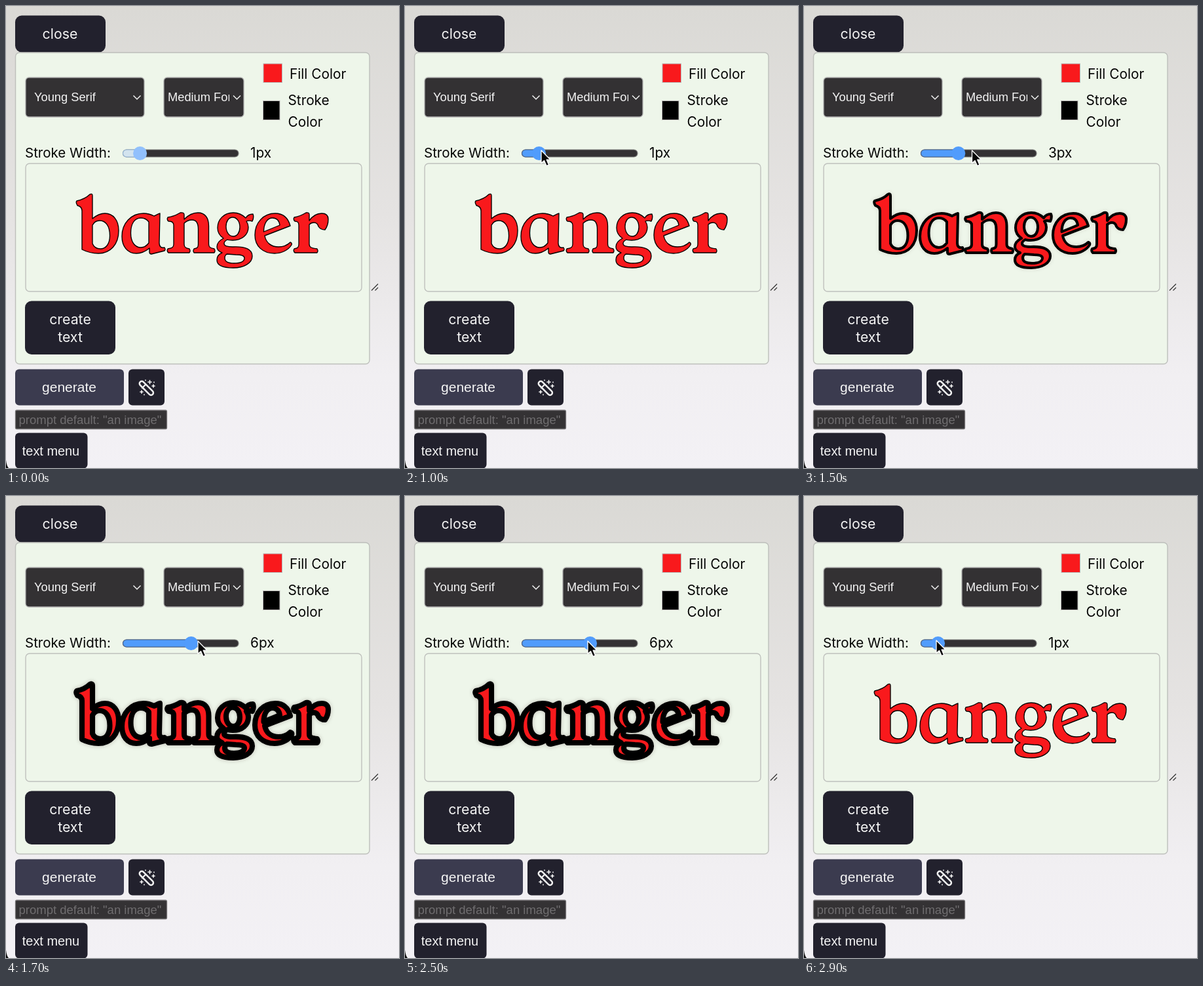
An HTML page that plays this animation: 600 by 704 pixels, repeating every 3000 ms.

```html
<!DOCTYPE html>
<html lang="en">
<head>
<meta charset="utf-8">
<title>Text menu</title>
<style>
  html, body { margin: 0; width: 100%; height: 100%; overflow: hidden; }
  svg { display: block; width: 600px; height: 704px; }
  text { font: 20.8px Inter, sans-serif; fill: #050505; }
  .arial { font-family: "Liberation Sans", Arial, sans-serif; }
  .small { font-size: 18.3px; }
  .light { fill: #f4f4f4; }
  .mid { text-anchor: middle; }
  .button { font-size: 21.3px; }
  .dark { fill: #22212d; }
  .field { fill: #333133; stroke: #aaa; stroke-width: 1.3; }
  .line { fill: none; stroke: #f0f0f0; stroke-width: 1.5; }
  .outline { fill: none; stroke: #bfc1bd; stroke-width: 1.4; }
</style>
</head>
<body>
<svg viewBox="0 0 600 704">
  <defs>
    <linearGradient id="sky" x2="0" y2="1">
      <stop stop-color="#dad9d5"/>
      <stop offset=".45" stop-color="#e5e3e2"/>
      <stop offset=".8" stop-color="#f1eff2"/>
      <stop offset="1" stop-color="#f3f1f5"/>
    </linearGradient>
    <clipPath id="selectClip"><rect x="243" y="112" width="98" height="54"/></clipPath>
  </defs>
  <rect width="600" height="704" fill="url(#sky)"/>
  <path d="M0 692Q1 701 4 704H0Z" fill="#111"/>

  <rect class="dark" x="14" y="14.500" width="138" height="56" rx="10"/>
  <text class="button light mid" x="82.500" y="50">close</text>

  <rect x="14.500" y="71" width="540.500" height="474.500" rx="6" fill="#eef6ea" stroke="#bdbfbb" stroke-width="1.400"/>
  <rect class="field" x="30" y="109" width="181" height="60" rx="5"/>
  <text class="arial small light" x="43" y="145">Young Serif</text>
  <path class="line" d="M194.500 136.500l5.500 5.500 5.500-5.500"/>
  <rect class="field" x="241" y="109" width="122" height="60" rx="5"/>
  <text class="arial small light" x="247" y="145" clip-path="url(#selectClip)">Medium Font</text>
  <path class="line" d="M347 136.500l5.500 5.500 5.500-5.500"/>

  <rect x="393" y="88" width="28.500" height="28.500" fill="#f9191c" stroke="#b9b5b5"/>
  <text x="433" y="110.500">Fill Color</text>
  <rect x="392.500" y="144.500" width="25.500" height="29" stroke="#b9b5b5"/>
  <text x="430.500" y="151">Stroke</text>
  <text x="430.500" y="184">Color</text>

  <text x="29" y="231" style="font-size:20.500px">Stroke Width:</text>
  <rect x="178.500" y="219" width="176.500" height="11" rx="5.500" fill="#333133" stroke="#777" stroke-width="1.200"/>
  <path id="filled" stroke-width="1.200"/>
  <circle id="thumb" cy="224.500" r="10.500"/>
  <text id="amount" x="373" y="231"></text>

  <rect class="outline" x="30" y="240" width="513" height="195" rx="6"/>
  <path d="M558 433.500l10-10M563.500 433.500l4.500-4.500" stroke="#333" stroke-width="1.200" fill="none"/>

  <g id="word" role="img" aria-label="banger" fill-rule="evenodd" stroke-linejoin="round"></g>

  <rect class="dark" x="29" y="449.500" width="138" height="81.500" rx="10"/>
  <text class="button light mid" x="98" y="485">create</text>
  <text class="button light mid" x="98" y="512">text</text>

  <rect x="14" y="553.500" width="166" height="55" rx="6" fill="#3b3b4f"/>
  <text class="arial light mid" x="96.500" y="588" style="font-size:21px">generate</text>
  <rect class="dark" x="187" y="553.500" width="55" height="55" rx="6"/>
  <g fill="none" stroke="#f2f2f2" stroke-linecap="round" stroke-linejoin="round">
    <rect x="-13" y="-3.500" width="27" height="7" rx="3.500" stroke-width="2.500" transform="translate(214 582) rotate(45)"/>
    <path stroke-width="2.200" d="M208 582l5-5"/>
    <path stroke-width="1.700" d="M217 573h5M219.500 570.500v5M223 579h4M225 577v4M205 588h4M207 586v4M213 570v.500M226 573v.500M211 592v.500"/>
  </g>

  <rect x="14.500" y="616" width="231" height="28.500" rx="2" fill="#343234" stroke="#757375" stroke-width="1.300"/>
  <text class="arial" x="19.500" y="636.500" style="font-size:18.500px;fill:#6f6d6f">prompt default: "an image"</text>
  <rect class="dark" x="14" y="650.500" width="110.500" height="54" rx="6"/>
  <text class="arial light mid" x="68.500" y="685" style="font-size:19.900px">text menu</text>

  <path id="cursor" d="M0 0V19.500L4.500 15.500 8 23.500 11.500 22 8.200 14.200H14Z" fill="#050505" stroke="#fff" stroke-width="1.300" stroke-linejoin="round"/>
</svg>
<script>
const $ = id => document.getElementById(id);

const letters = {
  b: `M108 297C117 295 124 291 128 287Q132 285 132 289V324C138 319 145 316 151 316C164 316 172 327 172 342
      C172 364 159 377 141 377C132 377 124 375 116 371V312C116 307 113 305 109 304Q106 299 108 297Z
      M132 334V362C134 367 138 370 144 370C153 370 158.5 362 158.5 350C158.5 335 152 327 143 327C138 327 134 330 132 334Z`,
  a: `M235 316L234 361C234 367 237 369 242 368Q244 371 242 373L222 378Q219 378 219 375V369C213 374 206 377 199 377
      C185 377 177 366 177 351C177 331 191 316 210 316C217 316 222 318 226 320C229 319 231 317 235 316Z
      M218 329C215 325 211 323 206 323C196 323 190.5 332 190.5 346C190.5 360 197 368 206 368C211 368 215 365 218 361Z`,
  n: `M247 322C255 321 261 318 266 315Q272 314 272 318V325C278 319 285 315 293 315C304 315 309.5 323 309.5 335V363
      C309.5 368 313 369 318 370Q320 373 318 376H287Q285 373 287 370C292 369 293.5 368 293.5 363V340C293.5 331 291 326 284 326
      C279 326 275 328 272 331V363C272 368 275 369 280 370Q282 373 280 376H248Q245 373 247 370C253 369 256 368 256 363
      V334C256 329 252 328 248 328Q245 325 247 322Z`,
  g: `M366 323C369 318 373 317 377 317Q379 322 376 328C373 327 369 327 367 328C369 331 370 334 370 337
      C370 349 360 357 346 357C343 357 340 357 338 356C334 358 333 360 333 362C333 366 338 367 346 367
      C366 366 376 371 376 381C376 392 363 399 347 399C331 399 322 395 322 387C322 382 325 378 330 376
      C325 374 322 371 322 367C322 361 326 357 332 354C326 350 323 344 323 338C323 325 333 315 347 315
      C355 315 361 318 366 323Z
      M346 322C340 322 336 328 336 336C336 345 341 351 347 351C353 351 357 345 357 337C357 328 352 322 346 322Z
      M337 378C334 380 334 382 334 384C334 390 340 392 348 392C358 392 364 389 364 384C364 380 359 379 351 379Z`,
  e: `M434 335L395 350C397 361 405 367 416 367C424 367 430 364 434 360Q437 361 436 364C431 372 421 377 410 377
      C392 377 380 366 380 349C380 330 393 316 411 316C424 316 431 324 434 335Z
      M393.5 344L418 334C417 327 413 323 407 323C399 323 393.5 331 393.5 344Z`,
  r: `M440 322C448 321 453 318 458 315Q463 314 463 318V327C468 320 475 316 482 316C488 316 492 319 492 325
      C492 332 490 337 487 341C483 341 479 339 477 336C476 332 473 330 470 330C467 330 465 331 463 333V363
      C463 368 467 369 475 370Q477 373 475 376H441Q438 373 440 370C445 369 447 368 447 363V334
      C447 329 445 328 441 328Q438 325 440 322Z`
};
const outline = Object.values(letters).join("");
$("word").innerHTML = `<path d="${outline}" fill="#f9191c"/><path id="stroke" d="${outline}" fill="none" stroke="#000"/>`;

const STEP = 100, STEPS = 30, SHOWN = 5, HOVER = 8, DRAG = 13;
// pointer keys: step, x, y
const path = [[5, 258, 262], [6, 238, 232], [7, 225, 226], [8, 214, 222], [10, 208, 220], [12, 211, 219],
  [13, 220, 219], [17, 293, 221], [20, 342, 219], [21, 338, 219], [25, 279, 221], [29, 202, 220]];
// stroke width per step while dragging
const widths = [1, 2, 3, 5, 6, 7, 9, 10, 10, 9, 8, 7, 6, 5, 4, 3, 1];

function pointer(step) {
  const i = path.findIndex(key => key[0] >= step);
  const [s1, x1, y1] = path[i], [s0, x0, y0] = path[Math.max(0, i - 1)];
  const k = s1 === s0 ? 0 : (step - s0) / (s1 - s0);
  return [x0 + (x1 - x0) * k, y0 + (y1 - y0) * k];
}

function render(step) {
  const width = step < DRAG ? 1 : widths[step - DRAG];
  const x = 189 + 15.6 * width;
  const hot = step >= HOVER;

  $("thumb").setAttribute("cx", x);
  $("thumb").setAttribute("fill", hot ? "#519cfc" : "#91c0fc");
  $("filled").setAttribute("d", `M${x} 219H184a5.500 5.500 0 0 0 0 11H${x}Z`);
  $("filled").setAttribute("fill", hot ? "#519cfc" : "#d3e3ee");
  $("filled").setAttribute("stroke", hot ? "#4a6288" : "#94b4d4");
  $("amount").textContent = width + "px";

  $("stroke").setAttribute("stroke-width", width * 1.35);
  $("word").style.filter = width > 1 ? `drop-shadow(0 0 3px rgba(30,0,0,${Math.min(.3, width * .04)}))` : "none";

  $("cursor").style.display = step < SHOWN ? "none" : "";
  if (step >= SHOWN) $("cursor").setAttribute("transform", `translate(${pointer(step)})`);
}

let last = -1;
function tick(now) {
  const step = Math.floor(now / STEP) % STEPS;
  if (step !== last) render(last = step);
  requestAnimationFrame(tick);
}
render(0);
requestAnimationFrame(tick);
</script>
</body>
</html>
```
